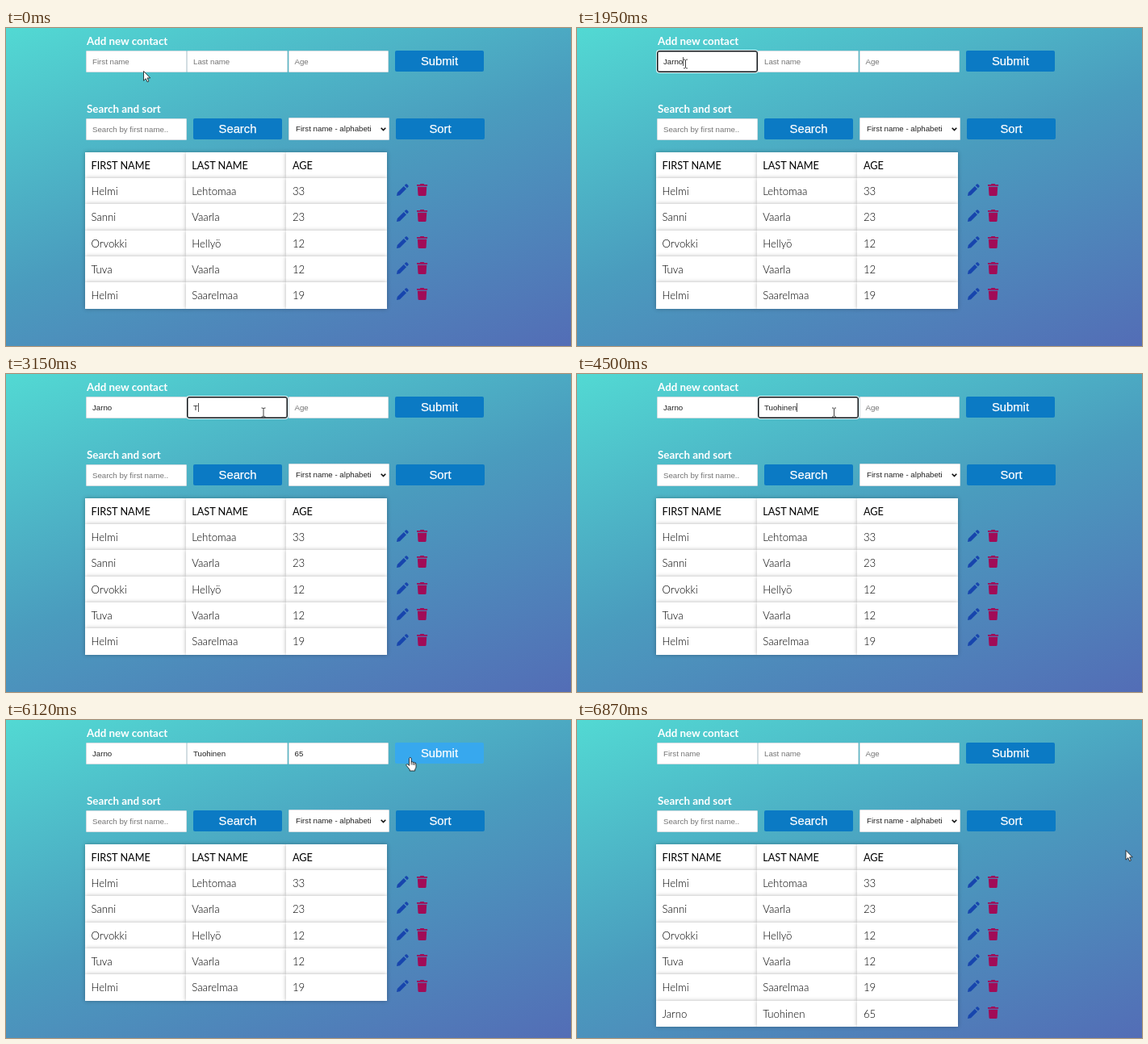
Animation, 700 px wide and 394 px high, one loop 6.9 s. Source, as an HTML page:

```html
<!DOCTYPE html>
<html lang="en">
<head>
<meta charset="utf-8">
<title>Contacts</title>
<style>
  html, body { margin: 0; width: 100%; height: 100%; overflow: hidden; }
  #stage {
    position: relative; width: 700px; height: 394px; overflow: hidden;
    background: linear-gradient(160deg, #52d9d3 0%, #4a9cbe 50%, #536db6 100%);
    font-family: "Liberation Sans", Arial, sans-serif;
  }
  #stage > *, .row > * { position: absolute; box-sizing: border-box; white-space: pre; }
  h2 { margin: 0; left: 100px; font: 700 13.35px/17px Lato, sans-serif; color: #fff; }
  .field, .select {
    height: 27px; padding-left: 7px; font-size: 9.7px; line-height: 25px;
    background: #fff; border: 1px solid #d3dde2; border-radius: 1px; color: #757575;
  }
  .field.filled, .select { color: #222; }
  .field.focus {
    border-color: #101418; border-radius: 3px; z-index: 1;
    box-shadow: inset 0 0 0 .5px #101418, 0 0 0 1px rgba(255, 255, 255, .85);
  }
  .caret { display: inline-block; width: 1px; height: 11px; margin-right: -1px; vertical-align: -2px; background: #555; }
  .button {
    width: 110px; height: 26px; border-radius: 2px; background: #0b7ac4;
    color: #fff; font-size: 14.8px; line-height: 26px; text-align: center;
    -webkit-text-stroke: .25px #fff;
  }
  .button.hover { background: #37a8ee; }
  .row { left: 0; top: 0; }
  .cell {
    height: 32.4px; padding-left: 7.5px; background: #fff; color: #000;
    box-shadow: 0 0 5px rgba(0, 0, 0, .3);
    font: 300 13.2px/33.8px Lato, sans-serif;
  }
  .head .cell { font-weight: 400; font-size: 12.7px; }
  svg { overflow: visible; }
  #pointer { left: 0; top: 0; z-index: 2; }
</style>
</head>
<body>
<div id="stage">
  <h2 style="top:8px">Add new contact</h2>
  <h2 style="top:92px">Search and sort</h2>
  <div class="field" style="left:99px;top:112px;width:125px">Search by first name..</div>
  <div class="select" style="left:350px;top:111px;width:125px;height:28px;padding-left:8px;line-height:26px">First name - alphabeti</div>
  <svg style="left:464px;top:123px" width="7" height="5"><path d="M.7 .7L3.5 3.5L6.3 .7" fill="none" stroke="#111" stroke-width="1.6"/></svg>
  <div class="button" id="submit" style="left:482px;top:28px">Submit</div>
  <div class="button" style="left:232px;top:112px">Search</div>
  <div class="button" style="left:483px;top:112px">Sort</div>
  <svg id="pointer" width="1" height="1" stroke="#111" stroke-width=".8" stroke-linejoin="round">
    <path id="arrow" fill="#fff" d="M0 0V11.7L2.7 9.2L4.6 13.3L6.4 12.5L4.6 8.4H8.2Z"/>
    <path id="beam" fill="none" d="M-2.5 -5.5Q-.3 -5.5 0 -4.5Q.3 -5.5 2.5 -5.5M0 -4.5V4.5M-2.5 5.5Q-.3 5.5 0 4.5Q.3 5.5 2.5 5.5"/>
    <path id="hand" fill="#fff" d="M-1.5 9.5V.8Q-1.4 -.5 -.2 -.5Q1 -.5 1.1 .8V5Q2.3 4.2 3.3 5.4Q4.4 4.8 5.2 6Q7 5.5 7 7.5V11Q7 13 5.7 14V16H-.8V14.5L-4.8 9.5Q-5.5 8.4 -4.5 7.8Q-3.6 7.4 -2.7 8.4ZM1.1 5V8.5M3.3 5.4V8.8M5.2 6V9"/>
  </svg>
</div>
<script>
const LOOP = 6900, STEP = 30, SUBMITTED = 6210;
const stage = document.getElementById('stage');
const $ = id => document.getElementById(id);

const people = [
  ['Helmi', 'Lehtomaa', 33],
  ['Sanni', 'Vaarla', 23],
  ['Orvokki', 'Hellyö', 12],
  ['Tuva', 'Vaarla', 12],
  ['Helmi', 'Saarelmaa', 19],
  ['Jarno', 'Tuohinen', 65]
];

const fields = [
  { x: 99, w: 125, hint: 'First name', text: 'Jarno', focus: [780, 2640], keys: [960, 1140, 1290, 1440, 1590] },
  { x: 224, w: 125, hint: 'Last name', text: 'Tuohinen', focus: [2640, 4800], keys: [2970, 3420, 3540, 3660, 3810, 3930, 4050, 4200] },
  { x: 349.5, w: 124.9, hint: 'Age', text: '65', focus: [4800, 6090], keys: [5250, 5400] }
];

// start, end, from, to
const moves = [
  [0, 330, [170.5, 53.5], [134.5, 44.5]],
  [1950, 2490, [134.5, 44.5], [319, 47.5]],
  [4500, 4800, [318.5, 47.5], [386, 42.5]],
  [5580, 5940, [386, 42.5], [501, 47]],
  [6510, 6870, [501, 47], [680, 161.5]]
];

function add(parent, cls, style, html = '') {
  const el = document.createElement('div');
  el.className = cls;
  el.style.cssText = style;
  el.innerHTML = html;
  parent.append(el);
  return el;
}

const icon = (x, y, color, d) =>
  `<svg style="left:${x}px;top:${y}px" width="15" height="15" fill="${color}"><path d="${d}"/></svg>`;
const PENCIL = 'M0 15L.8 11L8.8 3L12 6.2L4 14.2ZM9.7 2.1L11.2 .6Q12 -.1 12.8 .6L14.4 2.2Q15.1 3 14.4 3.8L12.9 5.3Z';
const TRASH = 'M4.4 0H8.7L9.2 .9H13.1V2.8H0V.9H3.9ZM.9 3.8H12.2L11.6 13.7Q11.5 15 10.2 15H2.9Q1.6 15 1.5 13.7Z';

function addRow(values, y, head) {
  const row = add(stage, head ? 'row head' : 'row', '');
  values.forEach((v, i) =>
    add(row, 'cell', `left:${98 + i * 124.7}px;top:${y}px;width:124.7px`, v));
  if (!head) row.insertAdjacentHTML('beforeend',
    icon(484, y + 7, '#1745ad', PENCIL) + icon(508.5, y + 7, '#a10b57', TRASH));
  return row;
}

addRow(['FIRST NAME', 'LAST NAME', 'AGE'], 153.7, true);
const rows = people.map((p, i) => addRow(p, 186 + i * 32.3));
const newRow = rows[rows.length - 1];

for (const f of fields) f.el = add(stage, 'field', `left:${f.x}px;top:28px;width:${f.w}px`);

function pointerAt(t) {
  let pos = moves[0][2];
  for (const [start, end, a, b] of moves) {
    if (t < start) break;
    const k = Math.min(1, (t - start) / (end - start));
    const e = k * k * (3 - 2 * k);
    pos = a.map((v, i) => v + (b[i] - v) * e);
  }
  return pos;
}

const inside = ([x, y], left, top, w, h) => x >= left && x < left + w && y >= top && y < top + h;

function drawField(f, t) {
  const typed = t < SUBMITTED ? f.text.slice(0, f.keys.filter(k => k <= t).length) : '';
  const focus = t >= f.focus[0] && t < f.focus[1];
  const caret = focus ? '<i class="caret"></i>' : '';
  const html = typed ? typed + caret : caret + f.hint;
  if (html !== f.html) f.el.innerHTML = f.html = html;
  f.el.classList.toggle('filled', typed !== '');
  f.el.classList.toggle('focus', focus);
}

function draw(now) {
  const t = Math.floor(now % LOOP / STEP) * STEP;
  const pos = pointerAt(t);
  const hover = inside(pos, 482, 28, 110, 26);
  const overField = fields.some(f => inside(pos, f.x, 28, f.w, 25));
  const shape = hover ? 'hand' : overField ? 'beam' : 'arrow';
  for (const id of ['arrow', 'beam', 'hand']) $(id).style.display = id === shape ? '' : 'none';
  $('pointer').style.transform = `translate(${pos[0]}px, ${pos[1]}px)`;
  $('submit').classList.toggle('hover', hover);
  fields.forEach(f => drawField(f, t));
  newRow.style.display = t >= SUBMITTED ? '' : 'none';
}

const origin = performance.now();
function tick() {
  draw(performance.now() - origin);
  requestAnimationFrame(tick);
}
tick();
</script>
</body>
</html>
```
